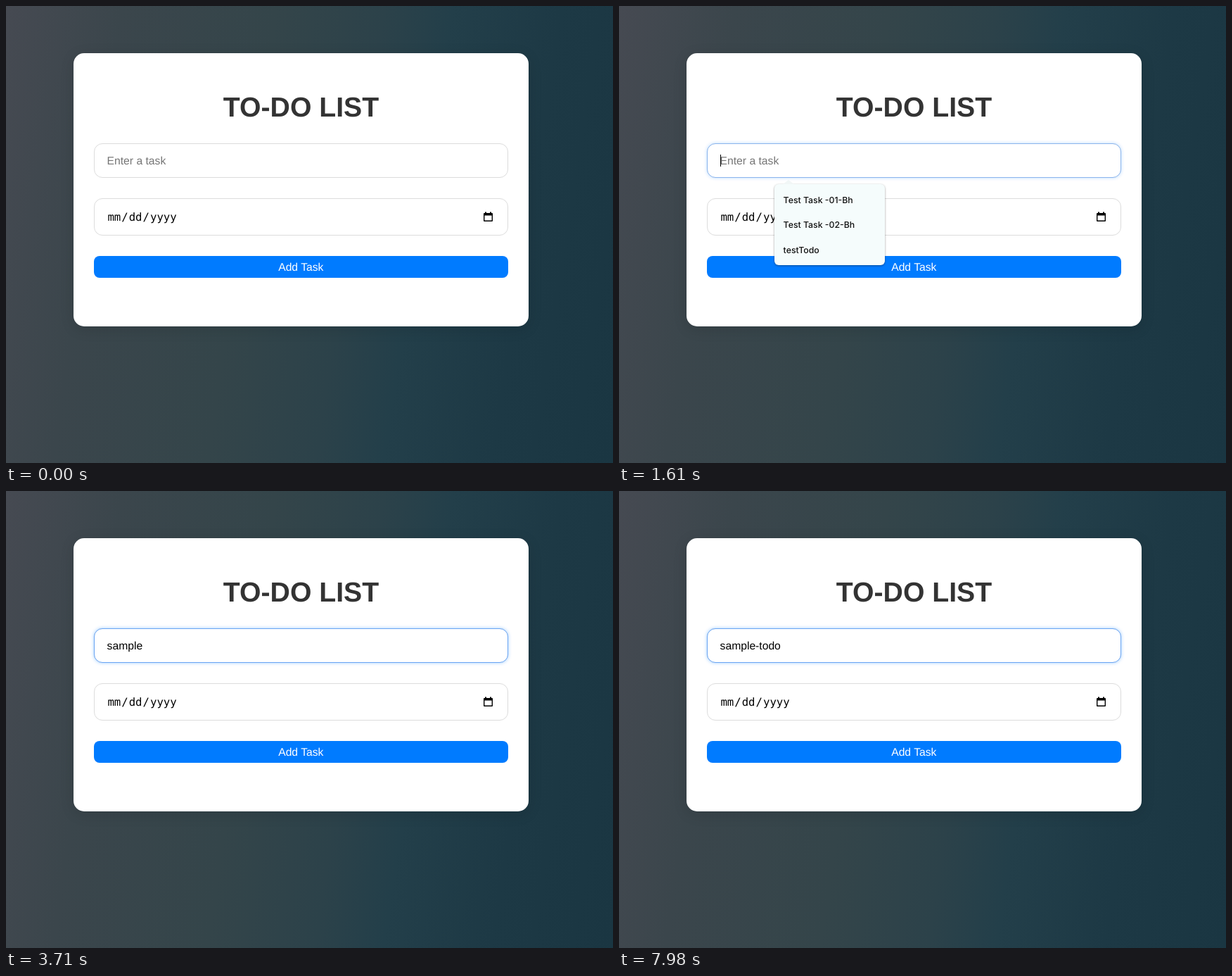
Write an HTML page that moves like this. It is 863 px wide and 649 px high and loops after 8 s.

```html
<!DOCTYPE html>
<html lang="en">
<head>
<meta charset="utf-8">
<title>To-do list</title>
<style>
  html, body { margin: 0; width: 100%; height: 100%; overflow: hidden; }
  body {
    position: relative;
    background: linear-gradient(98.7deg, #464a52 0%, #3b464c 17%, #34454a 40%,
      #2c424a 56%, #233f4a 66%, #1d3945 82%, #1a3642 100%);
  }
  div { position: absolute; box-sizing: border-box; }
  .card {
    left: 96px; top: 67px; width: 647px; height: 388px;
    border-radius: 15px; background: #fff;
    box-shadow: 0 4px 20px rgba(0, 0, 0, .12);
  }
  .field {
    left: 125px; width: 589px; border: 1px solid #dcdcdc;
    border-radius: 12px; background: #fff;
  }
  .task { top: 195px; height: 49px; }
  .date { top: 273px; height: 53px; }
  .focus {
    border-color: #6ba5f3; opacity: 0;
    box-shadow: 0 0 5px rgba(0, 123, 255, .38);
  }
  .button {
    left: 125px; top: 355px; width: 589px; height: 31px;
    border-radius: 8px; background: #007bff;
  }
  .popup {
    left: 221px; top: 253px; width: 157px; height: 115px;
    border-radius: 6px; background: #f5fcfc;
    box-shadow: 0 1px 3px rgba(0, 0, 0, .4);
  }
  .popup::before {
    content: ""; position: absolute; left: 12px; top: -6px;
    border: solid transparent; border-width: 0 8px 6px;
    border-bottom-color: #f1f6f6;
  }
  svg { position: absolute; left: 0; top: 0; }
  text {
    font: 15.68px "Liberation Sans", Arial, sans-serif;
    text-rendering: geometricPrecision; white-space: pre;
  }
  .title { font-size: 39.2px; font-weight: 700; fill: #333; }
  .mid { text-anchor: middle; }
  .mono text { font-family: "DejaVu Sans Mono", monospace; }
  .hints text { font: 500 12.3px Inter, sans-serif; fill: #111; }
</style>
</head>
<body>
<div class="card"></div>
<div class="field task"></div>
<div class="field task focus" id="focus"></div>
<div class="field date"></div>
<div class="button"></div>
<svg width="863" height="649">
  <text class="title mid" x="419.5" y="157">TO-DO LIST</text>
  <text id="entry" x="143.6" y="224.6"></text>
  <rect id="caret" y="211" width="1" height="17"/>
  <g class="mono">
    <text x="144.4" y="305">mm</text>
    <text x="164.3" y="305">/</text>
    <text x="174.7" y="305">dd</text>
    <text x="194.6" y="305">/</text>
    <text x="205" y="305">yyyy</text>
  </g>
  <path d="M681 292.5h2v1.5h5v-1.5h2v1.5h1q1 0 1 1v10q0 1-1 1h-11q-1 0-1-1v-10q0-1 1-1h1zM680.4 297.5v7.1h10.2v-7.1z" fill-rule="evenodd"/>
  <text class="mid" x="419.3" y="375.6" fill="#fff">Add Task</text>
</svg>
<div id="popup" style="inset:0">
  <div class="popup"></div>
  <svg class="hints" width="863" height="649">
    <text x="233.6" y="280.2">Test Task -01-Bh</text>
    <text x="233.6" y="315.4">Test Task -02-Bh</text>
    <text x="233.6" y="350.6">testTodo</text>
  </svg>
</div>
<script>
  const LOOP = 8000;
  // [time, text, caret shown]
  const typing = [
    [0, "", 0], [1470, "", 1], [1890, "s", 1], [1960, "sa", 1],
    [2240, "sam", 1], [2660, "samp", 1], [3080, "sampl", 1],
    [3150, "sample", 1], [3710, "sample", 0], [4200, "sample", 1],
    [4410, "samplet", 1], [4550, "sampletp", 1], [4690, "sampletpd", 1],
    [5180, "sampletp", 0], [5390, "samplet", 0], [5530, "sample", 0],
    [5740, "sample", 1], [6230, "sample", 0], [6510, "sample-", 1],
    [6720, "sample-t", 1], [6930, "sample-to", 1], [7000, "sample-tod", 1],
    [7490, "sample-todo", 1], [7980, "sample-todo", 0]
  ];
  // [time, focus ring opacity]
  const ring = [[0, 0], [1470, .08], [1540, .4], [1610, .72], [1680, .92], [1750, 1]];

  const [entry, caret, focusRing, popup] =
    ["entry", "caret", "focus", "popup"].map(id => document.getElementById(id));
  const at = (steps, t) => steps.findLast(step => step[0] <= t);

  function draw(t) {
    const [, text, shown] = at(typing, t);
    entry.textContent = text || "Enter a task";
    entry.setAttribute("fill", text ? "#000" : "#757575");
    const end = text ? entry.getComputedTextLength() : 0;
    caret.setAttribute("x", Math.round(143.6 + end));
    caret.style.visibility = shown ? "visible" : "hidden";
    focusRing.style.opacity = at(ring, t)[1];
    popup.style.visibility = t >= 1470 && t < 1890 ? "visible" : "hidden";
  }

  function tick() {
    draw(performance.now() % LOOP);
    requestAnimationFrame(tick);
  }
  tick();
</script>
</body>
</html>
```
